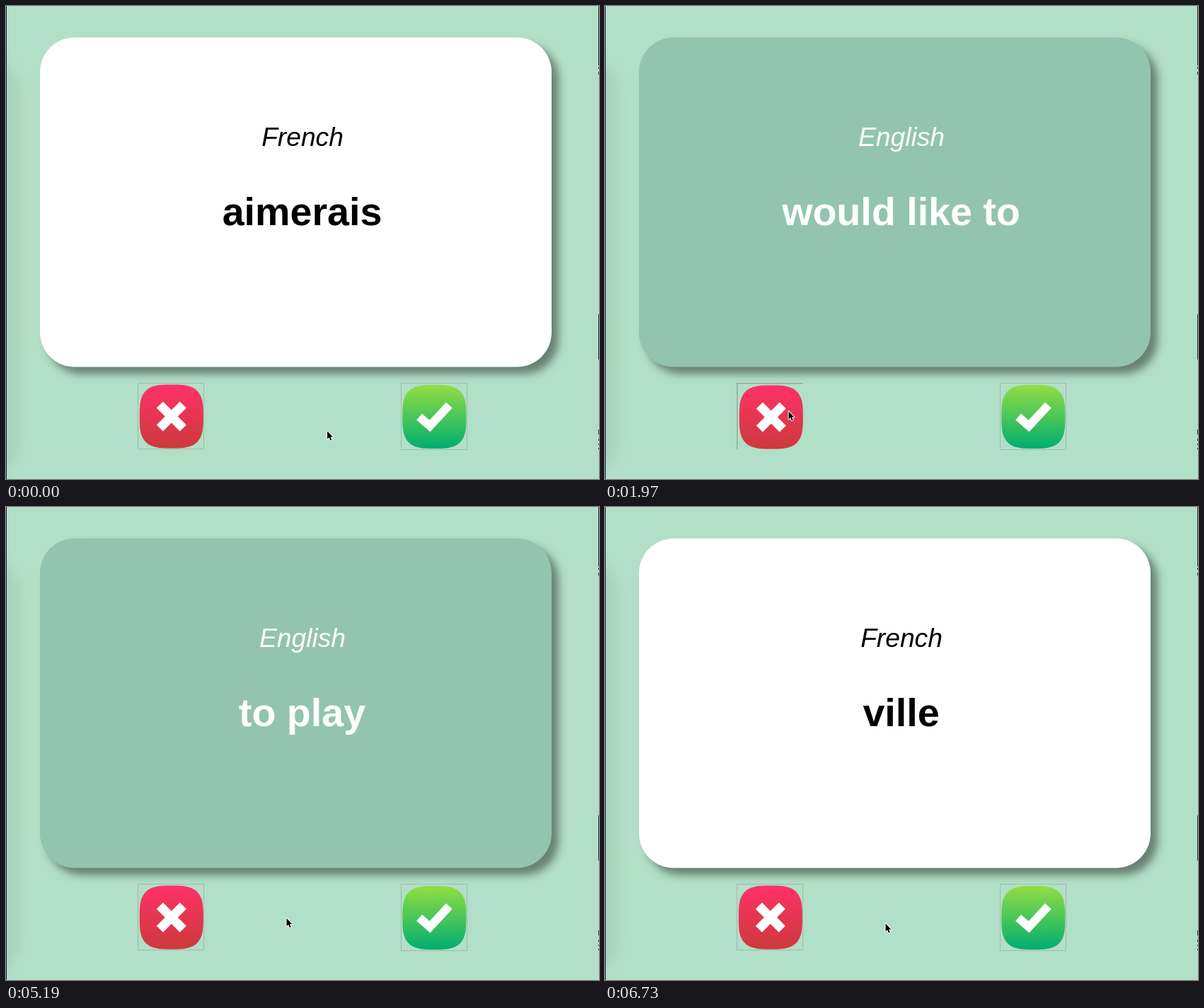
An HTML page with a canvas that plays this animation: 838 px wide and 669 px high, repeating every 8 s.

```html
<!DOCTYPE html>
<html lang="en">
<head>
<meta charset="utf-8">
<title>Flash cards</title>
<style>
  html, body { margin: 0; width: 100%; height: 100%; overflow: hidden; background: #b2dfc7; }
  canvas { display: block; width: 100vw; height: 100vh; }
</style>
</head>
<body>
<canvas id="stage" width="838" height="669"></canvas>
<script>
const ctx = document.getElementById('stage').getContext('2d');
const LOOP = 8000, TICK = 70, PHASE = 10;
const FONT = '"Liberation Sans", Arial, sans-serif';

const front = { fill: '#ffffff', ink: '#000000', lang: 'French' };
const back = { fill: '#93c4b0', ink: '#ffffff', lang: 'English' };

const cards = [
  { at: 0, side: front, word: 'aimerais' },
  { at: 500, side: back, word: 'would like to' },
  { at: 2040, side: front, word: 'jouer' },
  { at: 5190, side: back, word: 'to play' },
  { at: 6310, side: front, word: 'ville' }
];
const presses = [[1830, 2040], [6170, 6310]];

// Each move: time of its first step, number of steps, end point.
const start = [453, 600];
const moves = [
  { at: 1340, steps: 6, to: [258.5, 572] },
  { at: 2250, steps: 5, to: [395.5, 580.5] },
  { at: 5750, steps: 6, to: [253, 570] },
  { at: 6450, steps: 5, to: [395.5, 588] }
];

const ease = p => p * p * (3 - 2 * p);

function pointerAt(t) {
  let pos = start;
  for (const { at, steps, to } of moves) {
    if (t < at) break;
    const done = Math.floor((t - at) / TICK) + 1;
    const p = ease(Math.min(1, done / steps));
    pos = pos.map((v, i) => v + (to[i] - v) * p);
  }
  return pos;
}

function roundBox(x, y, w, h, r) {
  ctx.beginPath();
  ctx.roundRect(x, y, w, h, r);
}

function shadowBox(x, y, w, h, r, fill, shade, blur, dx, dy) {
  ctx.save();
  ctx.shadowColor = shade;
  ctx.shadowBlur = blur;
  ctx.shadowOffsetX = dx;
  ctx.shadowOffsetY = dy;
  ctx.fillStyle = fill;
  roundBox(x, y, w, h, r);
  ctx.fill();
  ctx.restore();
}

function polygon(points) {
  ctx.beginPath();
  points.forEach(([x, y]) => ctx.lineTo(x, y));
  ctx.closePath();
}

function drawBackground() {
  ctx.fillStyle = '#b2dfc7';
  ctx.fillRect(0, 0, 838, 669);
  // Soft edge of a shape lying off to the left.
  shadowBox(-700, 73, 219, 590, 50, '#000', 'rgba(0,0,0,0.055)', 14, 500, 0);
  ctx.fillStyle = '#2c1450';
  ctx.fillRect(0, 0, 1, 669);
  ctx.fillStyle = '#2b3a35';
  for (const [y, h] of [[0, 84], [86, 3], [93, 4], [436, 64], [599, 7], [612, 3], [619, 2], [625, 2]]) {
    ctx.fillRect(837, y, 1, h);
  }
}

function drawCard({ side, word }) {
  shadowBox(48, 44.5, 723, 466, 49, side.fill, 'rgba(0,0,0,0.42)', 12, 10, 10);
  ctx.fillStyle = side.ink;
  ctx.textAlign = 'center';
  ctx.textBaseline = 'alphabetic';
  ctx.font = `italic 37.2px ${FONT}`;
  ctx.fillText(side.lang, 419, 197.7);
  ctx.font = `bold 55.6px ${FONT}`;
  ctx.fillText(word, 418.5, 309.7);
}

// Superellipse of exponent 3.2.
function squircle(cx, cy, r) {
  const bend = v => Math.sign(v) * Math.abs(v) ** (2 / 3.2) * r;
  const points = Array.from({ length: 240 }, (_, i) => {
    const a = i * Math.PI / 120;
    return [cx + bend(Math.cos(a)), cy + bend(Math.sin(a))];
  });
  polygon(points);
}

function drawTile(cx, cy, top, bottom) {
  const paint = ctx.createLinearGradient(0, cy - 45, 0, cy + 45);
  paint.addColorStop(0, top);
  paint.addColorStop(1, bottom);
  ctx.fillStyle = paint;
  squircle(cx, cy, 45);
  ctx.fill();
}

function drawFrame(x, y, w, h, pressed) {
  ctx.lineWidth = 1;
  ctx.strokeStyle = '#9fbbad';
  if (!pressed) {
    ctx.strokeRect(x + 0.5, y + 0.5, w - 1, h - 1);
    return;
  }
  ctx.fillStyle = '#91aa9d';
  ctx.fillRect(x, y, w, 1.5);
  ctx.fillRect(x, y, 1.5, h);
}

function drawNo(pressed) {
  drawFrame(186, 533, 94, 94, pressed);
  const shift = pressed ? 1 : 0;
  const cx = 233.8 + shift, cy = 580.5 + shift;
  drawTile(cx, cy, '#ff3169', '#cc3a3b');
  ctx.save();
  ctx.translate(cx, cy);
  ctx.rotate(Math.PI / 4);
  ctx.fillStyle = '#fff';
  ctx.fillRect(-23.3, -6.5, 46.6, 13);
  ctx.fillRect(-6.5, -23.3, 13, 46.6);
  ctx.restore();
}

function drawYes() {
  drawFrame(558, 533, 94, 95, false);
  drawTile(605.3, 581, '#92de42', '#00ae70');
  ctx.strokeStyle = '#fff';
  ctx.lineWidth = 12;
  ctx.lineJoin = 'miter';
  ctx.beginPath();
  ctx.moveTo(584, 581);
  ctx.lineTo(599, 594);
  ctx.lineTo(626.3, 564.5);
  ctx.stroke();
}

function drawPointer([x, y]) {
  ctx.save();
  ctx.translate(x + 1, y + 1.2);
  polygon([[0, 0], [0, 11.2], [2.5, 8.9], [4.3, 13], [6.2, 12.2], [4.5, 8.2], [7.9, 8.2]]);
  ctx.lineJoin = 'round';
  ctx.lineWidth = 2;
  ctx.strokeStyle = '#fff';
  ctx.stroke();
  ctx.fillStyle = '#000';
  ctx.fill();
  ctx.restore();
}

function draw(t) {
  const pressed = presses.some(([from, to]) => t >= from && t < to);
  drawBackground();
  drawCard(cards.findLast(card => card.at <= t));
  drawNo(pressed);
  drawYes();
  drawPointer(pointerAt(t));
}

function loop() {
  const t = performance.now() % LOOP;
  draw(Math.max(0, Math.floor((t - PHASE) / TICK) * TICK + PHASE));
  requestAnimationFrame(loop);
}
loop();
</script>
</body>
</html>
```
